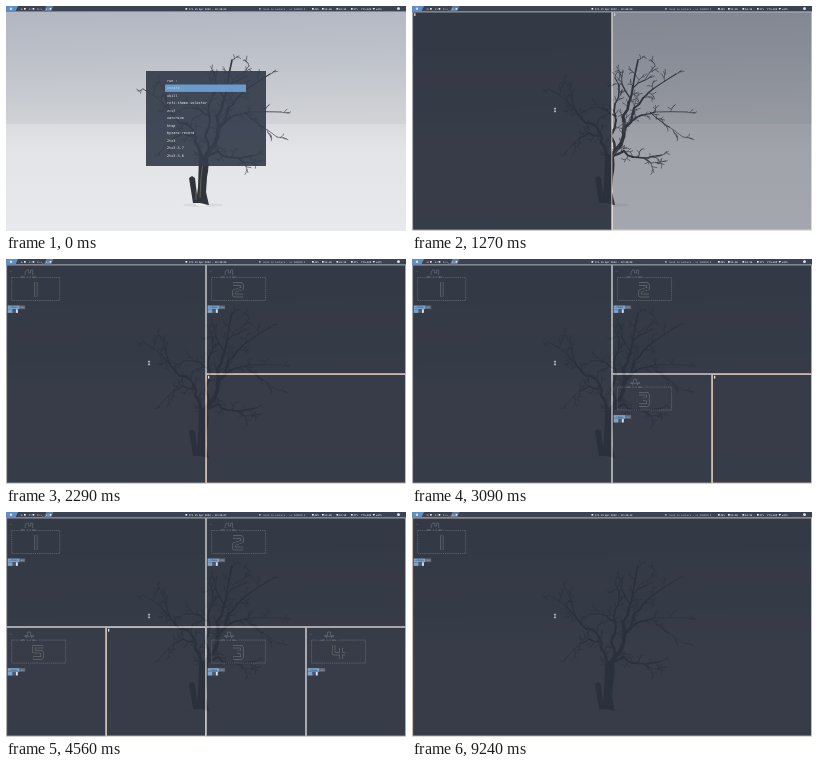
An HTML page for the animation above (9490 ms loop, 400x225 px).

```html
<!DOCTYPE html>
<html lang="en">
<head>
<meta charset="utf-8">
<title>Tiling desktop</title>
<style>
  html, body { margin: 0; width: 100%; height: 100%; overflow: hidden; background: #dcdee2; }
  svg { display: block; width: 100vw; height: 100vh; }
  text { font-family: "DejaVu Sans Mono", "Noto Sans Mono", monospace; white-space: pre; }
  .bar text { font-size: 2.4px; font-weight: bold; fill: #d8dee9; }
  .menu text { font-size: 3.5px; fill: #f0f2f6; }
  .frame { fill: #2a303d; fill-opacity: .93; stroke: #abacae; stroke-width: .8; }
  .focus .frame { stroke: #d8c0ae; }
  .art { fill: none; stroke: #85868a; stroke-width: .45; }
</style>
</head>
<body>
<svg id="stage" viewBox="0 0 400 225" preserveAspectRatio="none">
  <defs>
    <linearGradient id="sky" x2=".1" y2="1">
      <stop stop-color="#b0b5c0"/><stop offset=".5" stop-color="#bec2ca"/><stop offset="1" stop-color="#d0d2d6"/>
    </linearGradient>
    <linearGradient id="snow" x2="0" y2="1">
      <stop stop-color="#dadce0"/><stop offset=".25" stop-color="#e2e4e7"/><stop offset="1" stop-color="#e8e9ec"/>
    </linearGradient>
  </defs>
  <rect width="400" height="119" fill="url(#sky)"/>
  <rect y="118" width="400" height="107" fill="url(#snow)"/>
  <g id="tree"></g>
  <g id="windows"></g>
  <path id="pointer" d="M141.9 102.3h2.2M143 102.3v3.4M141.9 105.7h2.2" stroke="#e4e7ec" stroke-width=".7"/>
  <g id="menu" class="menu"></g>
  <g id="bar" class="bar"></g>
</svg>
<script>
const LOOP = 9490, FADE = 280;
const $ = id => document.getElementById(id);
const clamp = v => Math.max(0, Math.min(1, v));
const rect = (x, y, w, h, fill) => `<rect x="${x}" y="${y}" width="${w}" height="${h}" fill="${fill}"/>`;
const label = (x, y, s, extra = "") => `<text x="${x}" y="${y}" ${extra}>${s}</text>`;

// Tree: tapered limbs, each "width x y x y ...", with seeded bends and twigs.
const LIMBS = [
  "4.6 197 160 201 148 209 138 212 124 211 110 217 96 221 80 226 54",
  "2.6 211 126 219 116 222 102 231 92 241 83 264 68",
  "1.6 219 116 230 109 243 106 275 106",
  "1 238 106 250 116 271 131",
  "3.4 197 158 194 146 189 136 188 126 181 118",
  "1.8 184 120 174 117 166 108 155 95 137 83",
  "1.1 165 107 160 93 155 79",
  "2.4 203 146 199 130 204 114 203 98 207 84 203 72",
  "1.5 204 110 195 104 178 102",
  "1.6 189 130 177 127 168 132 155 145",
  "2.4 201 150 212 145 221 151 234 152 250 149",
  "1 231 152 239 157 246 157",
  "1.3 218 92 210 78 208 66",
  "1.1 221 82 233 74 243 60"
];
let seed = 29;
const rnd = () => (seed = seed * 16807 % 2147483647) / 2147483647;
const jitter = size => (rnd() - .5) * size;

function twig(x, y, angle, len, depth) {
  let d = `M${x.toFixed(1)} ${y.toFixed(1)}`, forks = "";
  for (let i = 0; i < 3; i++) {
    angle += jitter(1.1);
    x += Math.cos(angle) * len / 3;
    y += Math.sin(angle) * len / 3;
    d += `L${x.toFixed(1)} ${y.toFixed(1)}`;
    if (depth && i < 2) forks += twig(x, y, angle + (i ? .8 : -.8), len * .55, depth - 1);
  }
  return d + forks;
}

function drawTree() {
  let wood = "", twigs = "";
  for (const limb of LIMBS) {
    const [width, ...p] = limb.split(" ").map(Number);
    for (let i = 0; i + 3 < p.length; i += 2) {
      const [x, y, x2, y2] = p.slice(i, i + 4);
      const mx = (x + x2) / 2 + jitter(3), my = (y + y2) / 2 + jitter(3);
      const w = width * (1 - .75 * i / (p.length - 2));
      wood += `<path d="M${x} ${y}L${mx} ${my}L${x2} ${y2}" stroke-width="${w}"/>`;
      const angle = Math.atan2(y2 - y, x2 - x), side = i % 4 ? 1 : -1;
      twigs += twig(mx, my, angle + side * .8, 7 + rnd() * 5, 1);
      twigs += twig(x2, y2, angle - side * .6, 6 + rnd() * 4, 1);
    }
  }
  $("tree").innerHTML = `
    <ellipse cx="197" cy="199" rx="20" ry="1.8" fill="#d6d9dd"/>
    <g fill="none" stroke="#343840" stroke-linecap="round" stroke-linejoin="round">${wood}<path d="${twigs}" stroke-width=".6"/></g>
    <path d="M193 151L201 147Q204 158 201 171L200 186L203 199L190 197L192 181Z" fill="#30343b"/>
    <path d="M183 172L186 170L189 172L190 181L192 197L187 197Z" fill="#30343b"/>
    <path d="M197 155L195 172L194 192M201 150L207 141M190 184V194M212 126V116M189 134V126" fill="none" stroke="#776a60" stroke-width=".8"/>
    <path d="M188 198q7-3 14 2q-7 2-14-2" fill="#eceef0"/>`;
}

// Terminal windows
const X = [.7, 100.6, 200.6, 300.6], TOP = 6, MID = 115.6;
const HALF = 198.8, QUARTER = 98.8, TALL = 218, SHORT = 108.4;
const REGIONS = {
  full: [X[0], TOP, 398.7, TALL], left: [X[0], TOP, HALF, TALL], right: [X[2], TOP, HALF, TALL],
  topL: [X[0], TOP, HALF, SHORT], botL: [X[0], MID, HALF, SHORT],
  topR: [X[2], TOP, HALF, SHORT], botR: [X[2], MID, HALF, SHORT],
  q1: [X[0], MID, QUARTER, SHORT], q2: [X[1], MID, QUARTER, SHORT],
  q3: [X[2], MID, QUARTER, SHORT], q4: [X[3], MID, QUARTER, SHORT]
};
// time, focused window, regions of the open windows
const LAYOUTS = [
  [0, 0, {}],
  [750, 1, { 1: "full" }],
  [1165, 2, { 1: "left", 2: "right" }],
  [1730, 3, { 1: "left", 2: "topR", 3: "botR" }],
  [2330, 4, { 1: "left", 2: "topR", 3: "q3", 4: "q4" }],
  [3400, 1, { 1: "left", 2: "topR", 3: "q3", 4: "q4" }],
  [3680, 5, { 1: "topL", 2: "topR", 3: "q3", 4: "q4", 5: "botL" }],
  [4220, 6, { 1: "topL", 2: "topR", 3: "q3", 4: "q4", 5: "q1", 6: "q2" }],
  [5850, 5, { 1: "topL", 2: "topR", 3: "q3", 4: "q4", 5: "botL" }],
  [6600, 1, { 1: "left", 2: "topR", 3: "q3", 4: "q4" }],
  [6880, 3, { 1: "left", 2: "topR", 3: "q3", 4: "q4" }],
  [7290, 4, { 1: "left", 2: "topR", 4: "botR" }],
  [8140, 2, { 1: "left", 2: "right" }],
  [8800, 1, { 1: "full" }]
];
const OPENED = [750, 1165, 1730, 2330, 3680, 4220];
const READY = [1560, 1950, 2670, 3100, 4430, 5050];
const DIGITS = [
  "M3.5 0V14", "M1 1.5H9L10 3V6L2 8.5V13H11", "M1 1.5H9L10 3V6L8 7.2L10 8.5V12L9 13H1M5 7.2H8",
  "M1.5 0V8.5H13M9 3V14", "M11 1.5H1.5V6.5H9L10 8V12L9 13H1", "M10 1.5H3L1.5 3V13H10V7H1.5"
];

function terminal(i) {
  const icon = i < 2 ? "M18.5 10V7L20 5H22V8H24V5H26V10" : "M18 8H21V4.5H24V8H27V9H18ZM20 11V9M25 11V9";
  const wide = i ? 54 : 48;
  return `<g><rect class="frame"/>
    <g class="ready">
      ${label(2.5, 7, "~&gt;", 'font-size="2.4" fill="#85868a"')}
      <path class="art" d="${icon}"/>
      <path class="art" d="M5 12.5h${wide}v23h-${wide}z" stroke-dasharray="1.4 .7"/>
      ${rect(12, 11, 20, 2.6, "#363c48")}
      ${label(12.5, 13, "~GPU 1.3 GHz~", 'font-size="2.4" fill="#9b9c9e"')}
      <g transform="translate(25.5 17.5)" fill="none" stroke-linejoin="round">
        <path d="${DIGITS[i]}" stroke="#7c7d7e" stroke-width="3.3"/>
        <path d="${DIGITS[i]}" stroke="#363c48" stroke-width="2.4"/>
      </g>
      ${rect(1, 40.5, 12, 3.6, "#7ba3cd")}${rect(13, 40.5, 5.5, 3.6, "#626a78")}
      ${label(2, 43.2, "~/demo", 'font-size="2.4" fill="#2e3440"')}
      ${label(14, 43.2, "on", 'font-size="2.4" fill="#c5cad3"')}
      ${rect(1, 44.3, 5, 3.6, "#7ba3cd")}${rect(6, 44.3, 3, 3.6, "#4c566a")}
      ${rect(9.2, 44.3, 2, 3.6, "#d8dee9")}
    </g>
    <rect class="caret" x="1.4" y="1.2" width="1.3" height="2.8" fill="#d8dee9"/>
  </g>`;
}

// Launcher
const COMMANDS = ["xscale", "xkill", "rofi-theme-selector", "zcif", "xarchive", "htop", "byzanz-record", "2to3", "2to3-3.7", "2to3-3.6"];

function drawMenu() {
  $("menu").innerHTML =
    `<rect x="140" y="65" width="120" height="95" fill="#353c4b" fill-opacity=".92"/>` +
    rect(159, 78.5, 81, 7.4, "#6b9bcb") + label(161, 76, "run :") +
    COMMANDS.map((name, i) => label(161, 83.3 + i * 7.5, name, i ? "" : 'style="fill:#c3d8ee"')).join("");
}

// Status bar
function drawBar() {
  const status = [[306, "48%"], [316, "59.0G"], [330.5, "63.5G"], [345, "37%"]];
  const dot = (x, c = "#e5e9f0") => rect(x, 2, 1.7, 1.7, c);
  const slant = (x, w, fill) => `<path d="M${x} 0h${w}l-2.5 5.4h-${w}z" fill="${fill}"/>`;
  $("bar").innerHTML = rect(0, 0, 400, 5.4, "#3b4252") +
    slant(-2, 14, "#5f8fc2") + `<circle cx="5" cy="2.7" r="1.2" fill="#d8dee9"/>` +
    slant(40.5, 7, "#627c9c") +
    ["1:", "2:", "3:", "4:"].map((s, i) => label([14.5, 23, 31, 40][i], 3.6, s)).join("") +
    dot(18) + dot(26.6) + label(34.5, 3.6, "&gt;_") + dot(43.6) +
    dot(179.5) + label(183, 3.6, "", 'id="clock"') +
    dot(253, "#9aa3b2") + label(257.5, 3.6, "Dusk in Lantern - Lo VARREN 8", 'style="fill:#9aa3b2"') +
    status.map(([x, s]) => dot(x) + label(x + 2.6, 3.6, s)).join("") +
    label(355, 3.6, "", 'id="volume"') +
    `<path d="M366.5 2h2.6l-1.3 2z" fill="#e5e9f0"/>` + label(370, 3.6, "wifi") +
    `<circle cx="392.5" cy="2.7" r="1.4" fill="#e5e9f0"/>`;
}
// Each entry adds a second; one redraw catches up by two.
const TICKS = [1070, 2290, 3070, 4180, 5050, 7070, 7070, 8140, 9070];

drawTree();
drawMenu();
drawBar();
$("windows").innerHTML = DIGITS.map((_, i) => terminal(i)).join("");
const panes = [...$("windows").children].map(el => ({
  el, frame: el.querySelector(".frame"), ready: el.querySelector(".ready"), caret: el.querySelector(".caret")
}));

function render(t) {
  const [, focus, open] = LAYOUTS.filter(l => l[0] <= t).pop();
  panes.forEach((pane, i) => {
    const region = REGIONS[open[i + 1]];
    pane.el.style.display = region ? "" : "none";
    if (!region) return;
    const [x, y, w, h] = region;
    pane.el.setAttribute("transform", `translate(${x} ${y})`);
    pane.frame.setAttribute("width", w);
    pane.frame.setAttribute("height", h);
    pane.el.setAttribute("opacity", Math.max(.04, clamp((t - OPENED[i]) / FADE)));
    pane.el.setAttribute("class", focus === i + 1 ? "focus" : "");
    const ready = t >= READY[i];
    pane.ready.style.display = ready ? "" : "none";
    pane.caret.style.display = ready ? "none" : "";
  });
  $("menu").setAttribute("opacity", clamp(1 - (t - 30) / 230));
  $("pointer").setAttribute("opacity", clamp((t - 750) / FADE));
  const second = 3 + TICKS.filter(at => at <= t).length;
  $("clock").textContent = "Fri 15 Apr 2022 - 22:44:" + String(second).padStart(2, "0");
  $("volume").textContent = t >= 5340 && t < 9240 ? "77%+101" : "77%+100";
}

const start = performance.now();
function loop() {
  render((performance.now() - start) % LOOP);
  requestAnimationFrame(loop);
}
loop();
</script>
</body>
</html>
```
